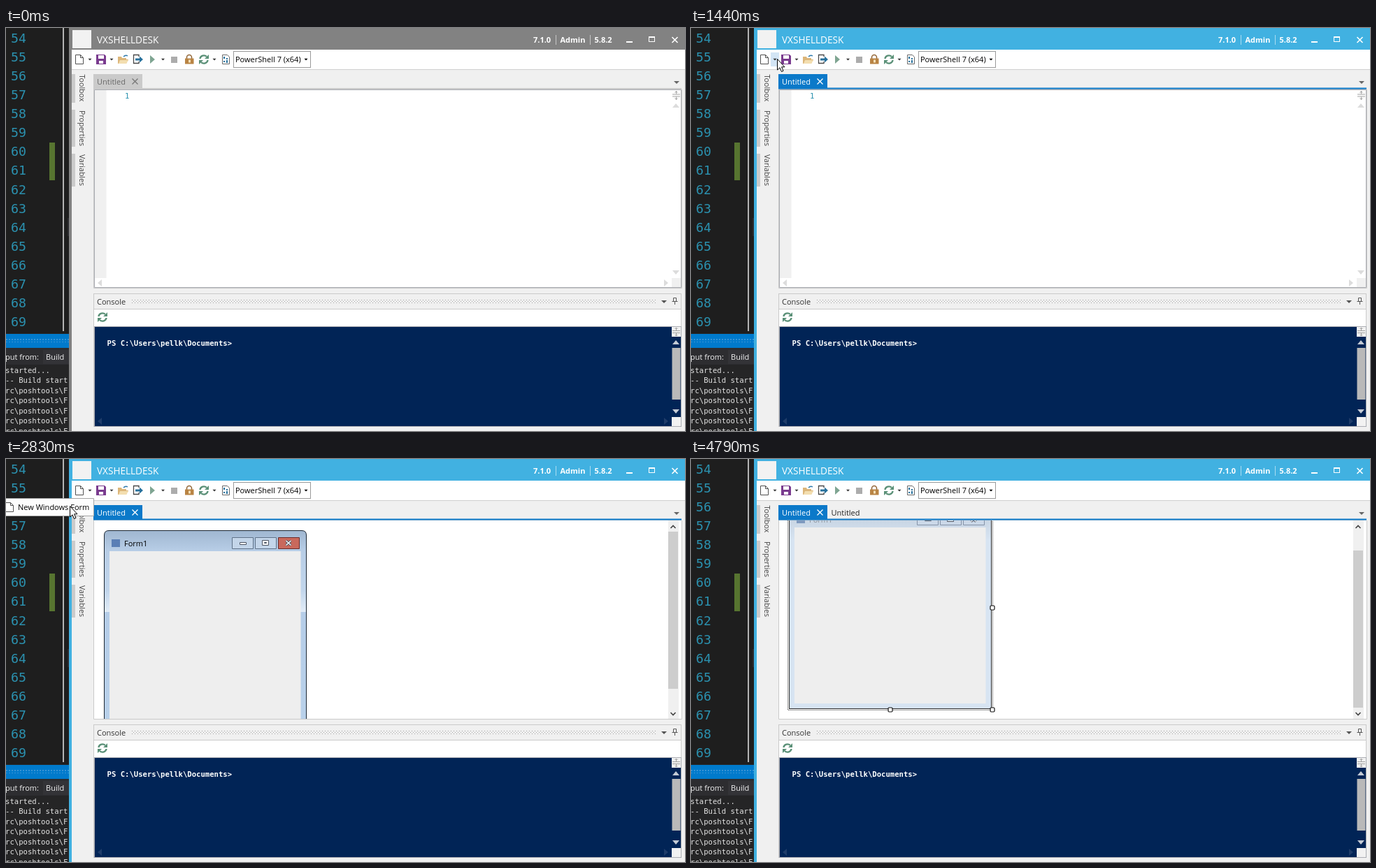
Recreate the animation shown at these times as an HTML page. Size 971 px wide and 577 px high, loop 5.11 s.

```html
<!DOCTYPE html>
<html lang="en">
<head>
<meta charset="utf-8">
<title>Script editor: new form</title>
<style>
html, body { margin: 0; width: 100%; height: 100%; overflow: hidden; background: #f0f0f0; }
svg, #ide { position: absolute; left: 0; top: 0; }
svg { width: 971px; height: 577px; font: 11px "Open Sans", sans-serif; }
pre, .mono { font-family: "DejaVu Sans Mono", monospace; }
pre { position: absolute; margin: 0; }

#ide { width: 90px; height: 577px; overflow: hidden; background: #1e1e1e; }
#ide i { position: absolute; }
#lines { left: 7px; top: 1px; font-size: 18.2px; line-height: 27.07px; color: #2b91af; }
#log { left: -1px; top: 482.5px; font-size: 10.6px; line-height: 14.5px; color: #e4e4e4; }
#ide span { position: absolute; font: 11px/20px "Open Sans", sans-serif; color: #f1f1f1; white-space: nowrap; }

.bold { font-weight: 700; }
.line { fill: none; stroke-width: 1; }

/* every change is a hard cut: one loop is 5110 ms */
.cut { opacity: 0; animation: 5110ms step-end infinite; }
.active { animation-name: active; }
.tab-hover { animation-name: tabHover; }
.drop-hover { animation-name: dropHover; }
.drop-open { animation-name: dropOpen; }
.menu { animation-name: menu; }
.menu-hover { animation-name: menuHover; }
.designer { animation-name: designer; }
.second-tab { animation-name: secondTab; }
.selected { animation-name: selected; }
.foot { animation-name: foot; }
.arrow { animation-name: arrow; }
.resize { animation-name: resize; }
.hand { animation-name: hand; }
.scroll { animation: scroll 5110ms step-end infinite; }
.thumb { animation: thumb 5110ms step-end infinite; }
.pointer { animation: move 5110ms step-end infinite; }

@keyframes active { 0% { opacity: 0 } 28.17%, 100% { opacity: 1 } }
@keyframes tabHover { 0% { opacity: 0 } 17.61% { opacity: 1 } 18.98%, 100% { opacity: 0 } }
@keyframes dropHover { 0% { opacity: 0 } 20.54% { opacity: 1 } 29.54%, 100% { opacity: 0 } }
@keyframes dropOpen { 0% { opacity: 0 } 29.54% { opacity: 1 } 49.11%, 100% { opacity: 0 } }
@keyframes menu { 0% { opacity: 0 } 29.54% { opacity: 1 } 56.75%, 100% { opacity: 0 } }
@keyframes menuHover { 0% { opacity: 0 } 29.54% { opacity: 1 } 46.18%, 100% { opacity: 0 } }
@keyframes designer { 0% { opacity: 0 } 55.38%, 100% { opacity: 1 } }
@keyframes secondTab { 0% { opacity: 0 } 56.75%, 100% { opacity: 1 } }
@keyframes selected { 0% { opacity: 0 } 58.51%, 100% { opacity: 1 } }
@keyframes foot { 0% { opacity: 0 } 75.73%, 100% { opacity: 1 } }
@keyframes scroll { 0% { transform: none } 73.77%, 100% { transform: translateY(-34px) } }
@keyframes thumb { 0% { transform: none } 73.77%, 100% { transform: translateY(27px) } }
@keyframes arrow {
  0% { opacity: 0 } 4.1% { opacity: 1 } 60.07% { opacity: 0 } 65.94% { opacity: 1 }
  68.1% { opacity: 0 } 89.23% { opacity: 1 } 93.73%, 100% { opacity: 0 }
}
@keyframes resize { 0% { opacity: 0 } 60.07% { opacity: 1 } 65.94%, 100% { opacity: 0 } }
@keyframes hand { 0% { opacity: 0 } 68.1% { opacity: 1 } 89.23%, 100% { opacity: 0 } }
@keyframes move {
  0%, 4.1% { transform: translate(831px, 560px) }
  5.67% { transform: translate(640px, 460px) }
  7.04% { transform: translate(440px, 340px) }
  8.61% { transform: translate(290px, 235px) }
  10.17% { transform: translate(190px, 165px) }
  11.54% { transform: translate(145px, 130px) }
  13.11% { transform: translate(124px, 111px) }
  14.48% { transform: translate(124px, 100px) }
  16.04% { transform: translate(125px, 87px) }
  17.61% { transform: translate(126px, 74px) }
  18.98% { transform: translate(125px, 62px) }
  20.54% { transform: translate(124px, 53px) }
  22.11% { transform: translate(123px, 48px) }
  23.67% { transform: translate(123px, 45px) }
  25.24% { transform: translate(123px, 44px) }
  36.98% { transform: translate(118px, 49px) }
  38.55% { transform: translate(108px, 57px) }
  40.11% { transform: translate(97px, 64px) }
  41.68% { transform: translate(91px, 67px) }
  65.94% { transform: translate(330px, 140px) }
  68.1% { transform: translate(600px, 222px) }
  70.05% { transform: translate(720px, 247px) }
  80.23% { transform: translate(718px, 247px) }
  81.99% { transform: translate(716px, 248px) }
  84.73% { transform: translate(722px, 257px) }
  86.3% { transform: translate(735px, 285px) }
  87.67% { transform: translate(755px, 326px) }
  89.23% { transform: translate(785px, 388px) }
  90.8% { transform: translate(830px, 460px) }
  92.17%, 100% { transform: translate(883px, 541px) }
}
</style>
</head>
<body>
<div id="ide">
  <i style="left:62px;top:164px;width:8px;height:54px;background:#577430"></i>
  <i style="left:81px;top:0;width:2px;height:434px;background:#b4b4b4"></i>
  <i style="left:88px;top:272px;width:2px;height:26px;background:#2c2c30"></i>
<pre id="lines">54
55
56
57
58
59
60
61
62
63
64
65
66
67
68
69</pre>
  <i style="left:0;top:437px;width:90px;height:140px;background:#252526"></i>
  <i style="left:0;top:438px;width:90px;height:20px;background:#007acc"></i>
  <i style="left:0;top:445px;width:90px;height:5px;background:radial-gradient(circle at 1px 1px,#3b96d6 0.7px,transparent 0.9px) 0 0/4px 4px"></i>
  <i style="left:0;top:458px;width:90px;height:24px;background:#2d2d30"></i>
  <i style="left:53px;top:461px;width:40px;height:20px;background:#333337"></i>
  <span style="left:-1px;top:461px">put from:</span>
  <span style="left:57px;top:461px">Build</span>
<pre id="log">started...
-- Build start
rc\poshtools\F
rc\poshtools\F
rc\poshtools\F
rc\poshtools\F
rc\poshtools\F</pre>
</div>

<svg viewBox="0 0 971 577">
<defs>
  <path id="caret" d="M-2.5-1.2h5L0 1.6z"/>
  <path id="tri" d="M-5 3L0-3 5 3z"/>
  <path id="chevron" d="M-3.5 2L0-1.5 3.5 2" fill="none" stroke="#444" stroke-width="1.6"/>
  <path id="cross" d="M-4-4L4 4M4-4L-4 4" fill="none"/>
  <path id="page" d="M.5.5h7l4 4v9H.5zM7.5.5v4h4" fill="#fff" stroke="#505050"/>
  <g id="refresh">
    <path d="M-5.5-1A5.5 5 0 0 1 4-4M5.5 1A5.5 5 0 0 1-4 4" fill="none" stroke="#5a9077" stroke-width="2.4"/>
    <path d="M7-7V-1H1zM-7 7V1H-1z" fill="#5a9077"/>
  </g>
  <g id="splitter" fill="none" stroke="#a0a0a0">
    <path d="M-5-1.5H6M-5 1.5H6M.5-6V-2M.5 2V6"/>
    <path d="M-1.5-4L.5-6l2 2M-1.5 4L.5 6l2-2"/>
  </g>
  <g id="handle"><rect x="-3" y="-3" width="6" height="6" rx="1.2" fill="#fff" stroke="#111" stroke-width="1.2"/></g>
  <g id="buttons">
    <path d="M334.5 119.5h9v3h-9zM366.5 116.5h9v7h-9zM369.5 119.5h3v1h-3z" fill="#fff" stroke="#4c5462"/>
    <path d="M400.5 117l7 6.5M407.5 117l-7 6.5" stroke="#4c5462" stroke-width="3.2"/>
    <path d="M400.5 117l7 6.5M407.5 117l-7 6.5" stroke="#fff" stroke-width="1.4"/>
  </g>
  <pattern id="grip" width="4" height="4" patternUnits="userSpaceOnUse" x="180" y="389">
    <path d="M0 0h1v1H0zM2 2h1v1H2z" fill="#a4a4a4"/>
  </pattern>
  <linearGradient id="glass" x1="0" y1="102" x2="0" y2="391" gradientUnits="userSpaceOnUse">
    <stop offset="0" stop-color="#9fb6d0"/><stop offset=".1" stop-color="#b7cde6"/>
    <stop offset=".3" stop-color="#c2d6ec"/><stop offset=".405" stop-color="#e2ecf7"/>
    <stop offset=".406" stop-color="#b5cde8"/><stop offset="1" stop-color="#b9d1ea"/>
  </linearGradient>
  <linearGradient id="dim" x1="0" y1="102" x2="0" y2="150" gradientUnits="userSpaceOnUse">
    <stop offset="0" stop-color="#bfcddb"/><stop offset="1" stop-color="#d7e4f2"/>
  </linearGradient>
  <clipPath id="view"><path d="M126 88H947V372H126z"/></clipPath>
  <clipPath id="upper"><path d="M130 95H440V372H130z"/></clipPath>
</defs>

<!-- window frame -->
<path d="M90 0H971V577H90z" fill="#f0f0f0"/>
<path d="M90 0H971V31H94V577H90z" fill="#828282"/>
<path class="cut active" d="M90 0H971V31H94V577H90z" fill="#41b1e1"/>
<rect x="95" y="3" width="27" height="26" fill="#f2f2f2"/>
<g fill="#fff">
  <text x="130" y="22" font-size="13.6">VXSHELLDESK</text>
  <g class="bold">
    <text x="754" y="21">7.1.0</text><text x="792.5" y="21">Admin</text><text x="841.5" y="21">5.8.2</text>
  </g>
  <path d="M786 10h1v14h-1zM835 10h1v14h-1z" opacity=".55"/>
  <path d="M887 19h9v2h-9z"/>
  <path d="M919 12h9v8h-9zm1 2v5h7v-5z" fill-rule="evenodd"/>
</g>
<use href="#cross" x="956.5" y="17" stroke="#fff" stroke-width="1.6"/>

<!-- toolbar -->
<path d="M94 31H971V59H94z" fill="#fff"/>
<path d="M94 59H971V60H94z" fill="#cfcfcf"/>
<path class="cut drop-hover" d="M114 35H126V55H114z" fill="#d3e5f5"/>
<g class="cut drop-open">
  <rect x="96.5" y="35.5" width="29" height="20" fill="#cbd9e6" stroke="#a9bccd"/>
  <path d="M114.5 36v19" stroke="#a9bccd"/>
</g>
<use href="#page" x="99" y="38"/>
<g fill="#333">
  <use href="#caret" x="120" y="45"/><use href="#caret" x="151" y="45"/>
  <use href="#caret" x="224.5" y="45"/><use href="#caret" x="298" y="45"/>
</g>
<path d="M129 38h12l2 2v12h-14z" fill="#7a3b8f"/>
<path d="M132 39h8v5h-8zM133 47h6v4h-6z" fill="#fff"/>
<path d="M160 41h5l1 2h6v2h3l-3 6h-12z" fill="#dcb67a"/>
<path d="M163 46h12l-3 5h-11z" fill="#f3deb0"/>
<path d="M168 41q3-3 6-1" fill="none" stroke="#2c78ab" stroke-width="1.5"/>
<path d="M190 41v-2.5h-7.5v12h7.5V48" fill="none" stroke="#4a4a4a" stroke-width="1.3"/>
<path d="M185 43.5h6V40.5l5 4.5-5 4.5v-3h-6z" fill="#28719c"/>
<path d="M206 39l7 6-7 6z" fill="#7fa592"/>
<path d="M236 41h9v9h-9z" fill="#acacac"/>
<path d="M258.5 44v-2a3.5 3.5 0 0 1 7 0v2" fill="none" stroke="#94683a" stroke-width="1.6"/>
<path d="M256 43.5h12.5v8H256z" fill="#b98444"/>
<path d="M261 45.5h3v4h-3z" fill="#f3dfb7"/>
<use href="#refresh" x="283" y="45"/>
<path d="M309.5 38.5h7l3 3v10h-10z" fill="#fff" stroke="#6a6a6a"/>
<path d="M311 41h2v3h-2zM315 43h2v2h-2zM311 47h2v2h-2zM315 46h2v4h-2z" fill="#28719c"/>
<rect x="325.5" y="33.5" width="110" height="23" fill="#fff" stroke="#9a9a9a"/>
<text x="328" y="49">PowerShell 7 (x64)</text>
<use href="#caret" x="429" y="45"/>

<!-- side labels -->
<path d="M94 66h5v41h-5zM94 117h5v53h-5zM94 180h5v47h-5z" fill="#cbcbcb"/>
<g fill="#444" font-size="10.6">
  <text transform="translate(104.5 66.5) rotate(90)">Toolbox</text>
  <text transform="translate(104.5 118) rotate(90)">Properties</text>
  <text transform="translate(104.5 181) rotate(90)">Variables</text>
</g>

<!-- document tabs -->
<path d="M125 66H195V86H966V88H125z" fill="#cacaca"/>
<path class="cut tab-hover" d="M125 66H195V86H125z" fill="#1c97ea"/>
<text x="130" y="81" fill="#6a6a6a">Untitled</text>
<use href="#cross" x="184.5" y="76.5" stroke="#777" stroke-width="1.3"/>
<g class="cut active">
  <path d="M125 66H195V85.5H966V87.5H125z" fill="#0b79c9"/>
  <text x="130" y="81" fill="#fff">Untitled</text>
  <use href="#cross" x="184.5" y="76.5" stroke="#fff" stroke-width="1.3"/>
</g>
<text class="cut second-tab" x="200.5" y="81" fill="#222">Untitled</text>
<path d="M955 76h8l-4 4z" fill="#666"/>

<!-- text editor -->
<path d="M125.5 88V372.5H966.5V88" fill="#fff" stroke="#cacaca"/>
<path d="M127 89h16.5v269H127zM952 358h13v13h-13z" fill="#f0f0f0"/>
<path d="M126.5 88.5H965.5V371.5H126.5z" class="line" stroke="#abadb3"/>
<text class="mono" x="170" y="101" fill="#2b91af" font-size="10.6">1</text>
<use href="#splitter" x="958" y="96.5"/>
<g fill="#dcdcdc">
  <use href="#tri" x="958" y="111"/>
  <use href="#tri" transform="translate(958 350) rotate(180)"/>
  <use href="#tri" transform="translate(134 365) rotate(-90)"/>
  <use href="#tri" transform="translate(944 365) rotate(90)"/>
</g>

<!-- form designer -->
<g class="cut designer">
  <path d="M126 88H966V372H126z" fill="#fff"/>
  <path d="M947 88h15v284h-15z" fill="#f0f0f0"/>
  <path class="thumb" d="M947 104h14v225h-14z" fill="#cdcdcd"/>
  <use href="#chevron" x="954" y="97"/>
  <use href="#chevron" transform="translate(954 365) rotate(180)"/>
  <g clip-path="url(#view)"><g class="scroll">
    <path d="M140.5 391V109Q140.5 102.5 147 102.5H423Q429.5 102.5 429.5 109V391" fill="url(#glass)" stroke="#1c2733"/>
    <path d="M323.5 112.5h30v16h-30zM356.5 112.5h30v16h-30z" fill="#c3d5e9" stroke="#5f7288"/>
    <path d="M389.5 112.5h30v16h-30z" fill="#c9695c" stroke="#6b2b2b"/>
    <use href="#buttons"/>
    <rect x="151" y="115" width="12" height="11" fill="#5b7fb5"/>
    <text x="169" y="125">Form1</text>
    <g class="cut selected">
      <path d="M140.5 391V109Q140.5 102.5 147 102.5H423Q429.5 102.5 429.5 109V391" fill="url(#dim)" stroke="#2a2a2a"/>
      <path d="M323.5 112.5h30v16h-30zM356.5 112.5h30v16h-30zM389.5 112.5h30v16h-30z" fill="#cbd8e8" stroke="#8593a8"/>
      <use href="#buttons"/>
      <rect x="151" y="115" width="12" height="11" fill="#7f9abf"/>
      <text x="169" y="125" fill="#8b939c">Form1</text>
    </g>
    <path d="M148 132h273.5v259H148z" fill="#eee"/>
    <g class="cut selected">
      <path clip-path="url(#upper)" d="M138.5 393V100.5H431.5V393" class="line" stroke="#444" stroke-dasharray="1 1"/>
      <use href="#handle" x="431" y="247"/>
    </g>
    <g class="cut foot">
      <path d="M141 384h288v7H141z" fill="#d7e4f2"/>
      <path d="M140 391.5h290" stroke="#2a2a2a"/>
      <path d="M138.5 372V393.5H431.5V372" class="line" stroke="#444" stroke-dasharray="1 1"/>
      <use href="#handle" x="285" y="393"/><use href="#handle" x="431" y="393"/>
    </g>
  </g></g>
</g>

<!-- console -->
<rect x="125.5" y="380.5" width="840" height="190" fill="#f0f0f0" stroke="#cacaca"/>
<text x="130" y="396" fill="#333">Console</text>
<path d="M180 389H930V394H180z" fill="url(#grip)"/>
<path d="M937 390h8l-4 4z" fill="#555"/>
<path d="M954.5 386.5h4v5h-4zM952.5 391.5h8M956.5 392v4" class="line" stroke="#555"/>
<path d="M126 402H965V427H126z" fill="#fff"/>
<path d="M126 402.5H965" stroke="#cacaca"/>
<use href="#refresh" x="138" y="414"/>
<path d="M126.5 427.5H965.5V570.5H126.5z" fill="#012456" stroke="#abadb3"/>
<path d="M952 428h13v14h-13zM952 557h13v13h-13z" fill="#f2f2f2"/>
<use href="#splitter" x="958" y="435"/>
<path d="M952.5 458h12v74h-12z" fill="#b9b9b9"/>
<g fill="#c3cad4">
  <use href="#tri" x="958" y="450"/>
  <use href="#tri" transform="translate(958 549) rotate(180)"/>
</g>
<g fill="#1f3c69">
  <use href="#tri" transform="translate(134 563) rotate(-90)"/>
  <use href="#tri" transform="translate(944 563) rotate(90)"/>
</g>
<text class="mono bold" x="144.5" y="455" fill="#fff" font-size="10.6">PS C:\Users\pellk\Documents&gt;</text>

<!-- drop-down menu -->
<g class="cut menu">
  <path d="M-1 56.5H125.5V81.5H-1z" fill="#fdfdfd" stroke="#a6a6a6"/>
  <path class="cut menu-hover" d="M0 58H125V79H0z" fill="#cbdff2"/>
  <use href="#page" x="-1" y="62"/>
  <text x="17" y="73">New Windows Form</text>
</g>

<!-- pointer -->
<g class="pointer" stroke="#000" fill="#fff" stroke-linejoin="round">
  <path class="cut arrow" d="M.5.5V16L4 12.8 6.5 18.5 9 17.4 6.6 11.8H11z"/>
  <path class="cut resize" d="M-10 0L-5.5-4.5V-1.5H5.5V-4.5L10 0 5.5 4.5V1.5H-5.5V4.5z"/>
  <g class="cut hand">
    <path d="M-1.5 2Q-1.5.5 0 .5T1.5 2V7.5Q4 6 5 8Q7.5 7 8 9Q10 8.5 10 10.5V14.5L8 18V20.5H-1V18L-5.5 12Q-6 10-4 10L-1.5 12.5z" stroke-width="1.2"/>
    <path d="M1.5 7.5v3.5M5 8v3M8 9v2.5" fill="none"/>
  </g>
</g>
</svg>
</body>
</html>
```
